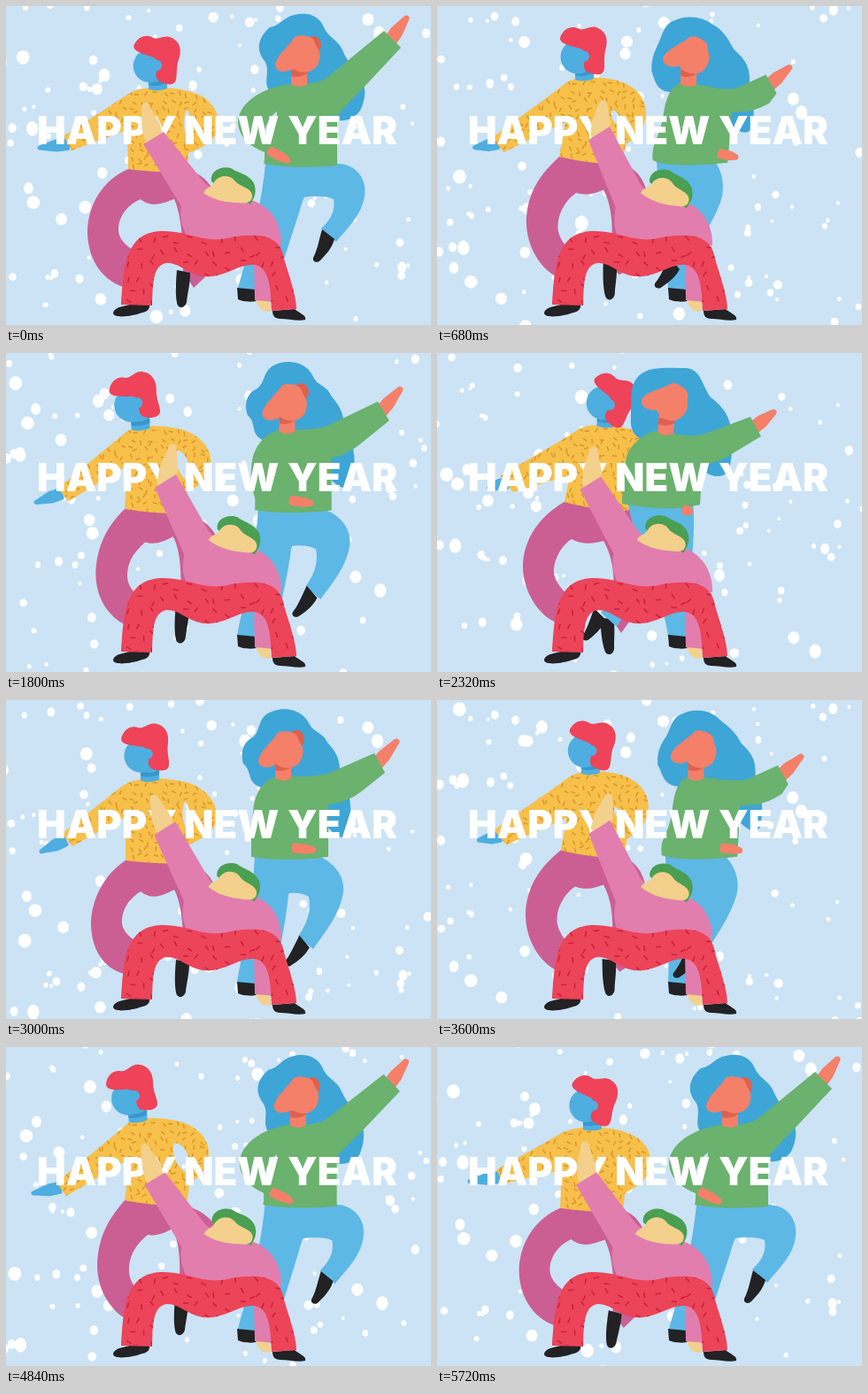
These frames come from a looping animation (480 px wide and 360 px high, 5.76 s). An HTML page:

```html
<!DOCTYPE html>
<html lang="en">
<head>
<meta charset="utf-8">
<title>Happy New Year</title>
<style>
html, body { margin: 0; width: 100%; height: 100%; overflow: hidden; background: #cbe3f5; }
svg { display: block; width: 100%; height: 100%; }
text { font: 900 43.5px Inter, "Open Sans", sans-serif; fill: #fff; }
</style>
</head>
<body>
<svg id="stage" viewBox="0 0 480 360"></svg>
<script>
const LOOP = 5760, STEP = 40;
const C = {
  blue: '#4eaee0', blueDark: '#3997cd', red: '#ee4358', yellow: '#f7c04a', fleck: '#dc982c',
  plum: '#cb5f93', wave: '#3ea5d7', jeans: '#5db8e6', green: '#6ab26d', orange: '#f4806a',
  rust: '#de614e', pink: '#e17eae', sand: '#f3d08c', leaf: '#4a9f52', pants: '#ec4459',
  pantsFleck: '#cd2139', black: '#222124'
};
const stage = document.getElementById('stage');
const updates = [];

let seed = 20;
const rand = () => (seed = (seed * 16807) % 2147483647) / 2147483647;

function add(tag, attrs, parent = stage) {
  const el = document.createElementNS('http://www.w3.org/2000/svg', tag);
  for (const k in attrs) el.setAttribute(k, attrs[k]);
  parent.append(el);
  return el;
}
const shape = (d, fill, parent) => add('path', { d, fill, 'fill-rule': 'evenodd' }, parent);
const numbers = s => s.match(/-?[\d.]+/g).map(Number);

// Periodic cubic through keyed poses, resting at each extreme.
function track(period, times, poses) {
  const rows = poses.map(numbers), n = rows.length;
  const row = i => rows[(i + n) % n];
  const time = i => times[(i + n) % n] + period * Math.floor(i / n);
  const slope = (i, j) => {
    const a = row(i - 1)[j], b = row(i)[j], c = row(i + 1)[j];
    return (b - a) * (c - b) > 0 ? (c - a) / (time(i + 1) - time(i - 1)) : 0;
  };
  return t => {
    const p = ((t - times[0]) % period + period) % period + times[0];
    let i = n - 1;
    while (times[i] > p) i--;
    const h = time(i + 1) - time(i), u = (p - time(i)) / h, v = u - 1;
    return row(i).map((b, j) =>
      (1 + 2 * u) * v * v * b + u * v * v * h * slope(i, j) +
      u * u * (3 - 2 * u) * row(i + 1)[j] + u * u * v * h * slope(i + 1, j));
  };
}

const timeline = (period, times, order) => poses => track(period, times, order.map(i => poses[i]));
const left = timeline(1440, [0, 120, 520, 880, 1320], [0, 1, 2, 3, 4]);
const tall = timeline(960, [-40, 20, 120, 360, 400, 540, 580, 820], [0, 0, 1, 2, 3, 3, 2, 1]);

function morph(line, fill, poses, parent) {
  const el = shape(poses[0], fill, parent), at = line(poses);
  updates.push(t => {
    const v = at(t);
    let i = 0;
    el.setAttribute('d', poses[0].replace(/-?[\d.]+/g, () => v[i++].toFixed(2)));
  });
  return el;
}

// Group placed by x, y, angle.
function rigid(at) {
  const g = add('g', {});
  updates.push(t => {
    const [x, y, a = 0] = at(t);
    g.setAttribute('transform', `translate(${x} ${y}) rotate(${a})`);
  });
  return g;
}

// Palm tapering to a pointing finger, from wrist to tip.
function hand(at, color, palm, finger, reach = 0.4) {
  const el = add('path', { fill: color, stroke: color, 'stroke-width': finger, 'stroke-linejoin': 'round' });
  updates.push(t => {
    const [x, y, tx, ty] = at(t), dx = tx - x, dy = ty - y;
    const k = (palm - finger) / 2 / Math.hypot(dx, dy), nx = -dy * k, ny = dx * k;
    const mx = x + dx * reach, my = y + dy * reach;
    el.setAttribute('d', `M${x + nx} ${y + ny}L${mx + nx} ${my + ny}L${tx} ${ty}L${mx - nx} ${my - ny}L${x - nx} ${y - ny}Z`);
  });
}

function flecks(x0, y0, x1, y1, step, length, stroke, parent) {
  let d = '';
  for (let y = y0; y < y1; y += step)
    for (let x = x0; x < x1; x += step) {
      const a = rand() * Math.PI, px = x + rand() * step * 0.7, py = y + rand() * step * 0.7;
      const dx = Math.cos(a) * length, dy = Math.sin(a) * length;
      d += `M${px.toFixed(1)} ${py.toFixed(1)}l${dx.toFixed(1)} ${dy.toFixed(1)}`;
    }
  return add('path', { d, stroke, 'stroke-width': 1.6, 'stroke-linecap': 'round' }, parent);
}

function clip(id) {
  const c = add('clipPath', { id });
  const g = add('g', { 'clip-path': `url(#${id})` });
  return [c, g];
}

function snow() {
  for (let i = 0; i < 125; i++) {
    const r = 2 + 5.5 * rand() ** 2, x = rand() * 490 - 5, y = rand() * 380;
    const turns = 2 + Math.floor(rand() * 2), phase = rand() * 6.28;
    const el = add('ellipse', { rx: r, ry: r * (1 + rand() * 0.25), fill: '#fff' });
    updates.push(t => {
      const u = t / LOOP;
      el.setAttribute('cx', x + 8 * Math.sin(u * 12.566 + phase));
      el.setAttribute('cy', (y + u * turns * 380) % 380 - 10);
    });
  }
}

function leftDancer() {
  morph(left, C.plum, [
    'M138 184C110 196 92 224 92 256C93 290 112 312 136 318L150 280C134 270 126 262 127 250C128 236 138 224 152 218C166 230 182 220 190 218C200 240 200 280 200 300L212 318L229 302C226 270 244 236 236 212C228 194 216 188 205 186Z',
    'M135 181C112 196 96 224 96 254C97 286 114 306 138 310L152 276C136 266 130 258 131 248C132 234 140 224 152 216C166 228 182 218 190 214C202 236 200 280 200 296L206 300L222 296C224 270 244 234 236 210C228 192 214 186 203 183Z',
    'M134 173C114 196 104 216 103 246C103 274 118 296 134 306L150 276C142 268 138 258 139 248C140 232 150 220 160 212C172 214 182 208 188 205C200 226 196 270 194 288L204 294L222 292C222 266 246 236 240 210C234 192 218 184 204 179Z',
    'M144 168C116 184 97 210 97 242C98 272 116 296 134 304L150 276C138 264 131 254 132 244C133 230 142 216 152 210C166 218 180 214 188 212C204 240 200 270 196 298L208 316L218 302C230 270 236 230 230 200C226 186 222 180 216 176Z',
    'M141 174C112 188 95 214 95 246C96 276 116 298 136 306L150 278C136 268 128 258 129 246C130 232 140 220 150 214C164 224 180 220 188 216C204 240 200 280 194 300L207 314L219 301C228 270 236 230 230 200C226 188 222 182 218 178Z'
  ]);
  const foot = rigid(left(['200 304 0', '199 299 0', '198 289 0', '192 304 -8', '201 303 14']));
  shape('M-7 -6L8 -3C8 10 5 20 4 30C2 38 -6 38 -7 31C-9 20 -8 6 -7 -6Z', C.black, foot);

  hand(left(['69 156 38 160', '66 159 40 171', '60 159 31 165', '78 147 59 152', '72 130 36 137']), C.blue, 14, 5);

  const torso = [
    'M150 94C170 90 196 92 212 98C232 104 242 122 240 136C238 152 222 160 206 166L205 187C184 188 160 187 138 184L137 140L74 163L65 147L128 106C136 100 142 96 150 94ZM204 116C210 124 210 138 204 150C200 138 200 126 204 116Z',
    'M150 90C166 87 190 89 208 94C228 102 240 118 238 134C236 150 220 158 204 164L203 184C182 185 158 184 135 181L135 132L75 165L63 151L130 98C138 93 142 91 150 90ZM202 114C209 122 209 136 204 147C199 136 198 124 202 114Z',
    'M148 82C162 79 180 80 196 84C217 90 230 104 229 122C227 140 216 148 207 154L204 180C180 180 156 177 134 173L140 126L68 168L57 153L130 93C136 87 141 83 148 82ZM190 108C204 110 210 126 204 142C192 134 186 120 190 108Z',
    'M172 82C186 80 204 82 218 86C236 92 246 106 246 122C246 140 232 152 220 160L216 178C190 178 164 174 144 168L150 138L86 157L71 139L148 94C156 88 163 84 172 82ZM208 130C208 130 208 130 208 130C208 130 208 130 208 130Z',
    'M165 87C182 84 204 86 218 92C236 98 246 110 244 126C240 144 230 154 224 160L220 180C194 182 164 180 141 174L148 136L74 138L72 122L136 96C146 91 155 88 165 87ZM208 130C208 130 208 130 208 130C208 130 208 130 208 130Z'
  ];
  morph(left, C.yellow, torso);
  const [mask, dotted] = clip('shirt');
  morph(left, '#000', torso, mask).setAttribute('clip-rule', 'evenodd');
  const dots = flecks(-102, 2, 110, 105, 9, 4, C.fleck, dotted);
  const origin = left(['150 94', '150 90', '148 82', '172 82', '165 87']);
  updates.push(t => dots.setAttribute('transform', `translate(${origin(t)})`));

  const neck = rigid(left(['171 84 0', '162 81 0', '148 74 -4', '191 73 4', '182 80 4']));
  shape('M-10 -10L11 -10L11 9C4 12 -4 12 -10 10Z', C.blue, neck);
  shape('M-10 -2C-2 3 6 1 11 -3L11 3C4 6 -4 7 -10 5Z', C.blueDark, neck);
  const head = rigid(left(['165 64 20', '154 59 9', '139 54 0', '191 54 40', '182 59 38']));
  add('circle', { cx: -1, cy: 4, r: 19, fill: C.blue }, head);
  shape('M-26 -12C-25 -22 -18 -28 -10 -27C-2 -25 2 -36 12 -34C22 -33 27 -24 27 -14C27 -4 32 4 32 10C32 17 22 18 15 17C9 16 8 10 8 4C8 -2 4 -7 -4 -6C-12 -6 -26 -4 -26 -12Z', C.red, head);
  add('circle', { cx: 6, cy: 1, r: 6, fill: C.blue }, head);
}

function tallDancer() {
  morph(tall, C.wave, [
    'M300 98C288 88 300 74 292 62C282 50 284 36 298 24C310 22 314 12 326 10C342 6 354 12 359 24C364 36 376 38 381 52C386 64 394 70 400 80C408 92 406 106 400 118C390 132 372 132 356 124Z',
    'M286 98C272 92 278 80 268 72C264 56 270 46 279 42C288 34 284 22 296 15C312 6 334 10 342 26C348 38 358 36 363 48C372 58 378 66 377 84C388 100 392 120 388 150C384 160 370 158 350 124Z',
    'M250 97C230 99 224 87 225 73C226 61 229 50 230 40C232 26 240 18 252 16C266 14 276 16 288 17C304 18 308 38 316 50C326 58 338 68 337 90C338 108 336 122 332 130C326 138 316 138 300 124Z',
    'M244 98C224 100 218 88 219 74C219 62 219 52 220 42C222 28 232 20 244 18C258 16 268 17 282 17C298 18 300 38 309 50C320 58 334 72 332 94C334 112 333 126 327 136C318 142 306 140 290 124Z'
  ]);
  // Raised leg, then the standing one.
  morph(tall, C.jeans, [
    'M310 178L372 178C396 177 408 196 405 214C402 236 386 250 373 266L356 251C368 240 372 230 370 218C362 214 348 214 335 216C320 214 312 200 310 178Z',
    'M298 175L345 174C370 179 383 200 381 216C378 240 362 260 347 281L330 267C340 252 345 238 342 222C336 218 328 217 319 218C304 214 298 200 298 175Z',
    'M240 170L290 171C292 190 286 210 276 226C262 250 238 280 224 306L208 292C222 270 230 250 236 226C236 216 236 206 236 200C236 190 238 180 240 170Z',
    'M230 166L288 168C290 190 284 210 272 226C256 250 220 280 203 309L185 293C210 270 224 250 230 226C230 216 230 206 230 200C230 190 230 180 230 166Z'
  ]);
  morph(tall, C.jeans, [
    'M293 178L350 178C348 200 337 214 335 220C326 250 312 290 302 325L262 318C276 270 288 230 293 178Z',
    'M281 175L340 174C338 196 322 212 319 220C316 250 308 290 300 325L261 318C270 270 278 230 281 175Z',
    'M223 170L293 170C295 190 293 210 292 230C290 250 287 290 286 325L261 321C258 280 232 230 223 170Z',
    'M215 166L289 166C291 190 290 210 288 230C288 250 286 290 284 325L261 321C258 280 226 230 215 166Z'
  ]);
  shape('M261 318L282 320C284 325 288 327 288 331C282 335 267 334 262 331Z', C.black);
  const foot = rigid(tall(['364 258 0', '337 273 12', '214 297 10', '184 295 6']));
  shape('M-7 -6L7 5C4 16 -4 24 -10 30C-16 33 -19 28 -16 24C-12 16 -10 4 -7 -6Z', C.black, foot);

  hand(tall(['434 39 452 14', '418 73 441 47', '358 93 380 76', '358 84 380 67']), C.orange, 15, 7);
  morph(tall, C.green, [
    'M322 88C296 90 264 106 262 130C262 150 280 160 292 165C292 172 292 176 291 178C318 183 350 182 374 180L374 124C384 112 392 104 402 94L446 47L427 28L366 78C354 88 342 88 322 88ZM306 119C296 126 290 140 292 152C300 146 306 134 306 119Z',
    'M306 86C290 90 280 106 279 128C277 146 277 158 277 164C277 170 277 174 277 177C305 182 340 180 364 177L364 118C384 116 396 108 408 98L428 82L416 60L366 82C346 88 330 86 306 86ZM300 140C300 140 300 140 300 140C300 140 300 140 300 140Z',
    'M253 87C242 92 232 104 228 124C224 142 220 152 219 162C218 168 218 170 219 172C240 182 275 180 302 176L309 122C322 124 332 118 342 114L366 102L353 82L306 98C290 100 276 88 253 87ZM256 135C256 135 256 135 256 135C256 135 256 135 256 135Z',
    'M246 88C232 92 216 104 213 122C211 140 210 152 209 164C209 167 209 169 209 170C240 176 270 178 297 171L300 124C316 126 326 118 336 112L366 94L354 72L300 92C282 96 268 90 246 88ZM250 135C250 135 250 135 250 135C250 135 250 135 250 135Z'
  ]);
  hand(tall(['299 164 318 174', '326 167 347 169', '308 168 319 173', '280 177 286 179']), C.orange, 11, 7, 0.6);

  const neck = rigid(tall(['331 78 0', '313 78 0', '264 78 4', '259 80 4']));
  shape('M-9 -14L9 -14L9 10C4 14 -4 14 -9 10Z', C.orange, neck);
  shape('M-9 -6L9 -8L9 -2C4 2 -4 3 -9 1Z', C.rust, neck);
  const ear = rigid(tall(['347 44', '328 44', '268 50', '263 50']));
  add('ellipse', { rx: 9, ry: 10, fill: C.rust }, ear);
  const head = rigid(tall(['335 54 0', '316 56 0', '270 55 28', '265 55 28']));
  shape('M-9 -19C-15 -9 -29 1 -31 12C-31 22 -17 22 -11 16C-3 24 14 22 18 10C21 2 19 -4 16 -8C13 -12 14 -16 10 -18C5 -21 -5 -22 -9 -19Z', C.orange, head);
}

function greeting() {
  for (const [word, x] of [['HAPPY', 35], ['NEW', 201], ['YEAR', 318]])
    add('text', { x, y: 156 }).textContent = word;
}

function frontDancer() {
  const sway = poses => track(480, [15, 120, 245, 360, 400, 440], poses);
  const lean = sway(['0', '.95', '1.25', '1', '.5', '.15']);
  const front = ([a, b]) => {
    const from = numbers(a), to = numbers(b);
    return t => {
      const w = lean(t)[0];
      return from.map((v, i) => v + (to[i] - v) * w);
    };
  };
  const tip = sway(['156 114', '167 111', '194 110', '188 107', '177 110', '167 111']);
  const wrist = front(['168 152', '181 147']);

  hand(t => [...wrist(t), ...tip(t)], C.sand, 21, 9);
  morph(front, C.pink, [
    'M155 156L178 142L222 197C232 208 244 214 258 216C290 216 312 238 311 270L250 275L205 262C200 250 195 240 198 226Z',
    'M168 152L192 137L226 196C232 208 245 216 262 218C292 218 312 240 311 270L250 275L205 262C199 250 199 240 201 227Z'
  ]);
  const head = rigid(front(['251 206 0', '257 208 4']));
  shape('M-19 -8C-21 -20 -8 -26 3 -23C10 -18 20 -17 26 -10C32 -4 31 6 29 10L25 18L12 8L-10 -1Z', C.leaf, head);
  shape('M-28 5C-25 -2 -19 -1 -16 -7C-11 -16 2 -16 7 -9C12 -2 27 -1 27 8C27 16 20 17 12 16C-4 16 -18 12 -28 5Z', C.sand, head);

  shape('M282 331L298 331L299 344C291 347 284 341 282 331Z', C.sand);
  shape('M280 285L304 290L303 334L281 332Z', C.pink);
  shape('M121 347C122 338 138 339 146 335L162 337C163 341 160 345 154 346C143 350 123 353 121 347Z', C.black);
  shape('M301 344L326 342C330 346 340 349 338 354C330 356 318 353 310 353C303 353 301 349 301 344Z', C.black);
  const legs = 'M130 337C133 300 132 256 175 254C205 253 222 268 250 262C285 255 310 258 314 285C322 312 328 328 328 342L300 344C299 320 298 294 280 292C262 291 245 308 222 305C205 302 196 290 182 290C165 292 166 315 165 338Z';
  shape(legs, C.pants);
  const [mask, dotted] = clip('legs');
  shape(legs, '#000', mask);
  flecks(132, 258, 328, 342, 14, 5, C.pantsFleck, dotted);
}

snow();
leftDancer();
tallDancer();
greeting();
frontDancer();

const start = performance.now();
function draw() {
  const t = Math.floor((performance.now() - start) % LOOP / STEP) * STEP;
  for (const update of updates) update(t);
  requestAnimationFrame(draw);
}
draw();
</script>
</body>
</html>
```
